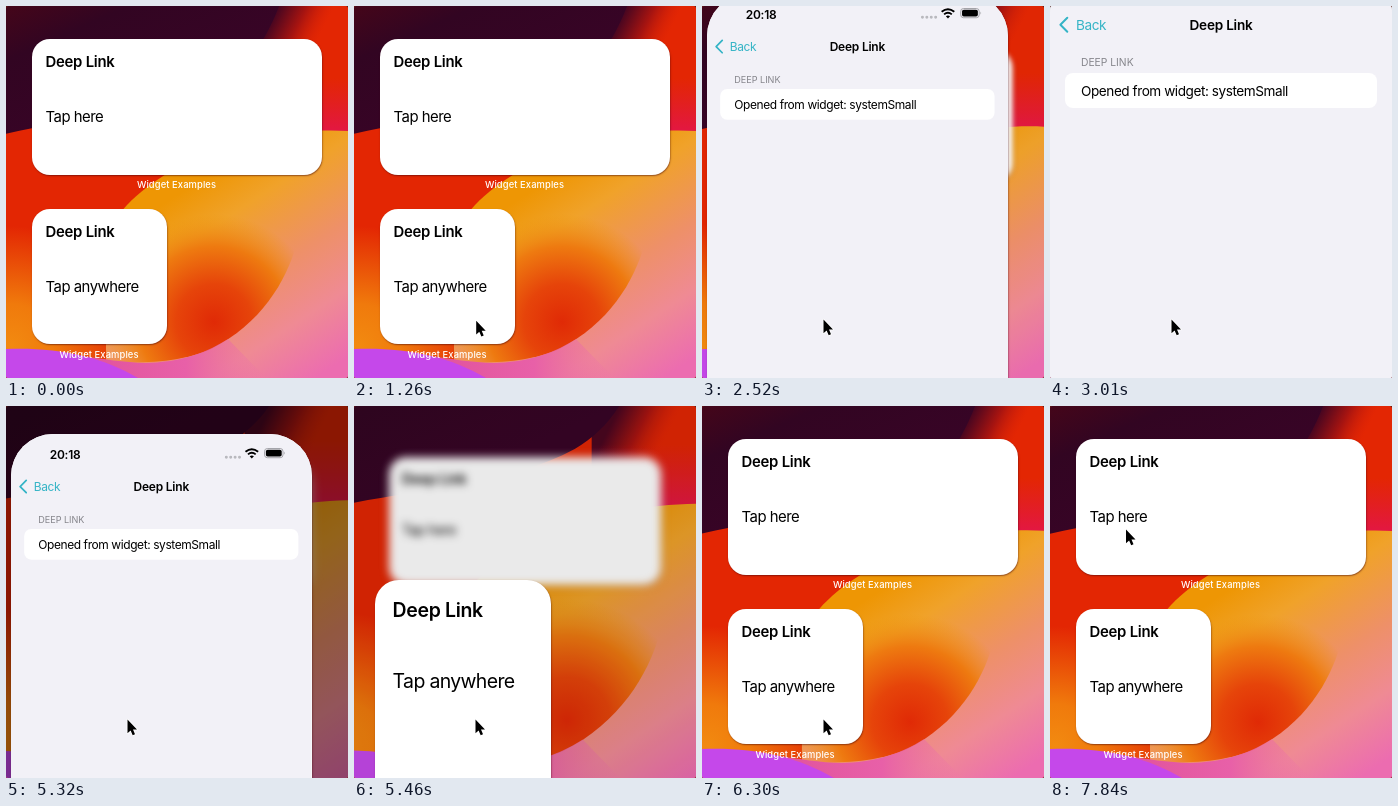
These frames come from a looping animation (342x372 px, 8 s). An HTML page:

```html
<!DOCTYPE html>
<html lang="en">
<head>
<meta charset="utf-8">
<title>Deep link</title>
<style>
  html, body { margin: 0; width: 100%; height: 100%; overflow: hidden; background: #222; }
  body { font-family: Inter, "Liberation Sans", sans-serif; color: #000; }
  #stage { position: relative; width: 342px; height: 372px; overflow: hidden; border-radius: 2px; }
  #stage > *, .at { position: absolute; }
  .fill { inset: 0; }
  #wall, #home { transform-origin: 171px 329px; }
  #dim { background: #000; }
  .tile { position: absolute; background: #fff; border-radius: 18px; box-shadow: .5px 1px 1.5px rgba(60, 0, 10, .5); }
  #card { overflow: hidden; }
  .face { position: absolute; left: 0; top: 0; transform-origin: 0 0; }
  .at { white-space: nowrap; line-height: 20px; letter-spacing: -.033em; }
  .bold { font-weight: 600; letter-spacing: -.017em; }
  .tile .at { font-size: 14.9px; left: 13.5px; top: 67.6px; }
  .tile .bold { top: 13px; }
  .caption { font-size: 9.4px; font-weight: 500; letter-spacing: .01em; color: #fff; transform: translateX(-50%); }
  #app { width: 342px; height: 742px; background: #f2f1f7; }
  #app .at { font-size: 13.6px; left: auto; }
  #app .mid { left: 171px; transform: translateX(-50%); }
</style>
</head>
<body>
<div id="stage">
  <svg id="wall" width="342" height="372" viewBox="0 0 342 372">
    <defs>
      <linearGradient id="night" gradientUnits="userSpaceOnUse" x1="0" y1="-10" x2="60" y2="125">
        <stop offset="0" stop-color="#480618"/><stop offset=".4" stop-color="#320522"/><stop offset="1" stop-color="#380426"/>
      </linearGradient>
      <linearGradient id="shade" gradientUnits="userSpaceOnUse" x1="262" y1="24" x2="306" y2="46">
        <stop offset="0" stop-color="#4a0620"/><stop offset=".5" stop-color="#a81410"/><stop offset="1" stop-color="#d42008" stop-opacity="0"/>
      </linearGradient>
      <linearGradient id="rose" x1="0" y1="0" x2="0" y2="1">
        <stop offset="0" stop-color="#e0144c" stop-opacity="0"/><stop offset="1" stop-color="#e4125a"/>
      </linearGradient>
      <radialGradient id="glow" gradientUnits="userSpaceOnUse" cx="5" cy="340" r="120">
        <stop offset="0" stop-color="#f28a10"/><stop offset=".35" stop-color="#f07a0c"/><stop offset="1" stop-color="#f07a0c" stop-opacity="0"/>
      </radialGradient>
      <linearGradient id="ribbon" gradientUnits="userSpaceOnUse" x1="185" y1="180" x2="310" y2="372">
        <stop offset="0" stop-color="#ee9604"/><stop offset=".2" stop-color="#f0a22a"/>
        <stop offset=".5" stop-color="#ee9068"/><stop offset=".75" stop-color="#ef8a94"/><stop offset="1" stop-color="#ec6cb0"/>
      </linearGradient>
      <radialGradient id="ember" gradientUnits="userSpaceOnUse" cx="208" cy="316" r="108">
        <stop offset="0" stop-color="#e02a06"/><stop offset=".35" stop-color="#e6440a"/>
        <stop offset=".7" stop-color="#ee7a10"/><stop offset="1" stop-color="#ee9608" stop-opacity="0"/>
      </radialGradient>
      <linearGradient id="hem" gradientUnits="userSpaceOnUse" x1="60" y1="0" x2="260" y2="0">
        <stop offset="0" stop-color="#e0509a"/><stop offset=".6" stop-color="#e860a8"/><stop offset="1" stop-color="#ec6cb0" stop-opacity="0"/>
      </linearGradient>
    </defs>
    <rect width="342" height="372" fill="#e32603"/>
    <rect x="230" y="-40" width="112" height="140" fill="url(#shade)"/>
    <rect x="230" y="72" width="112" height="70" fill="url(#rose)"/>
    <path d="M-30 136C50 110 140 116 215 76C248 56 264 30 284-30H-30Z" fill="url(#night)"/>
    <rect y="220" width="140" height="152" fill="url(#glow)"/>
    <path d="M342 125C300 122 236 130 178 158C140 178 115 200 100 228V372H342Z" fill="url(#ribbon)"/>
    <path d="M100 215C190 190 300 190 290 240C280 275 255 318 205 343C180 354 150 358 100 356Z" fill="url(#ember)"/>
    <path d="M0 343C60 343 95 356 140 357C170 356 195 350 222 333L260 372H0Z" fill="url(#hem)"/>
    <path d="M0 343C50 341 95 350 132 372H0Z" fill="#c548ea"/>
  </svg>
  <div id="home" class="fill">
    <div class="tile" style="left:26px;top:33px;width:290px;height:136px">
      <div class="at bold">Deep Link</div>
      <div class="at">Tap here</div>
    </div>
    <div class="at caption" style="left:170.5px;top:169px">Widget Examples</div>
    <div class="at caption" style="left:93px;top:339px">Widget Examples</div>
  </div>
  <div id="dim" class="fill"></div>
  <div id="card" class="tile">
    <div id="widget" class="face">
      <div class="at bold">Deep Link</div>
      <div class="at">Tap anywhere</div>
    </div>
    <div id="app" class="face">
      <div class="at bold" style="left:44px;top:13px">20:18</div>
      <svg class="at" style="left:240px;top:12px" width="80" height="22">
        <path d="M5 14.5H21" stroke="#b9b9be" stroke-width="3.4" stroke-linecap="round" stroke-dasharray="0 5"/>
        <path d="M26.8 8.2Q34 2.4 41.2 8.2M29.6 11.2Q34 7.4 38.4 11.2" fill="none" stroke="#000" stroke-width="2.1"/>
        <path d="M31.6 13.4Q34 11.4 36.4 13.4L34 16Z"/>
        <rect x="48.5" y="4.5" width="21" height="10.5" rx="3.2" fill="none" stroke="#9a9a9f"/>
        <rect x="50" y="6" width="18" height="7.5" rx="2"/>
        <path d="M71 8q1.6 1.7 0 3.5z" fill="#9a9a9f"/>
      </svg>
      <svg class="at" style="left:8px;top:51px" width="14" height="18">
        <path d="M9.3 1.8L2.4 8.8L9.3 15.8" fill="none" stroke="#35b4c6" stroke-width="2" stroke-linecap="round" stroke-linejoin="round"/>
      </svg>
      <div class="at" style="left:26px;top:50px;color:#35b4c6">Back</div>
      <div class="at bold mid" style="top:50px">Deep Link</div>
      <div class="at" style="left:31px;top:87px;font-size:10.3px;letter-spacing:0;color:#85858b">DEEP LINK</div>
      <div class="at" style="left:15px;top:108px;width:312px;height:35px;border-radius:8px;background:#fff"></div>
      <div class="at" style="left:31px;top:116px">Opened from widget: systemSmall</div>
    </div>
  </div>
  <svg id="cursor" width="16" height="24" viewBox="-2 -2 16 24" style="left:-1px;top:-1px">
    <path d="M.5.5V14.3L3.6 11.4L5.7 16.2L8 15.2L6 10.5H10Z" stroke="#fff" stroke-width="1.6" paint-order="stroke" stroke-linejoin="round"/>
  </svg>
</div>
<script>
  const LOOP = 8000, STEP = 70;
  const SHOW = 910, PRESS = 2200, OPEN = 2310, CLOSE = 5250;
  const $ = id => document.getElementById(id);
  const [wall, home, dim, card, widget, app, cursor] =
    ['wall', 'home', 'dim', 'card', 'widget', 'app', 'cursor'].map($);
  const captions = document.querySelectorAll('.caption');

  const moves = [
    { from: SHOW, to: 1400, x: 120, y: 312 },
    { from: 6580, to: 6930, x: 83, y: 330 },
    { from: 6930, to: 7140, x: 74, y: 129 },
    { from: 7280, to: 7840, x: 74.5, y: 122 }
  ];

  const mix = (a, b, p) => a + (b - a) * p;
  const clamp = v => Math.max(0, Math.min(1, v));
  const easeOut = u => 1 - (1 - u) ** 3;

  // Falls from 1 to 0 once s passes zero.
  const settle = (s, span, power) => Math.exp(-((Math.max(0, s) / span) ** power));

  // 0 on the home screen, 1 inside the app.
  const opened = (t, span, power = 1.8) =>
    t < CLOSE ? 1 - settle(t - OPEN, span, power) : settle(t - CLOSE, span, power);

  function pointer(t) {
    let x = 150, y = 366;
    for (const m of moves) {
      const p = easeOut(clamp((t - m.from) / (m.to - m.from)));
      x = mix(x, m.x, p);
      y = mix(y, m.y, p);
    }
    return [x, y];
  }

  function draw(t) {
    const grow = opened(t, 161), rise = opened(t, 134, 1.7);
    const away = opened(t, 316), zoom = opened(t, 508, 2.2);
    const w = mix(135, 342, grow);

    wall.style.transform = `scale(${1 + .15 * zoom})`;
    home.style.transform = away > .001 ? `scale(${1 - .1 * away})` : 'none';
    home.style.filter = away > .01 ? `blur(${7.5 * away}px)` : 'none';
    dim.style.opacity = .5 * away ** 3.8;
    captions.forEach(c => c.style.opacity = clamp(1 - 2 * away));

    const press = t < CLOSE ? clamp((t - PRESS) / (OPEN - PRESS)) * (1 - grow) : 0;
    const shade = 255 - 52 * press;
    Object.assign(card.style, {
      left: mix(26, 0, grow) + 'px',
      top: mix(203, -41, rise) + 'px',
      width: w + 'px',
      height: mix(135, 742, grow) + 'px',
      borderRadius: mix(18, 48, grow) + 'px',
      background: `rgb(${shade}, ${shade}, ${shade})`
    });
    widget.style.transform = `scale(${w / 135})`;
    app.style.transform = `scale(${w / 342})`;
    app.style.opacity = clamp((grow - .3) / .3);

    const [x, y] = pointer(t);
    cursor.style.transform = `translate(${x}px, ${y}px)`;
    cursor.style.visibility = t < SHOW ? 'hidden' : 'visible';
  }

  const start = performance.now();
  function tick() {
    const t = (performance.now() - start) % LOOP;
    draw(Math.floor(t / STEP) * STEP);
    requestAnimationFrame(tick);
  }
  tick();
</script>
</body>
</html>
```
